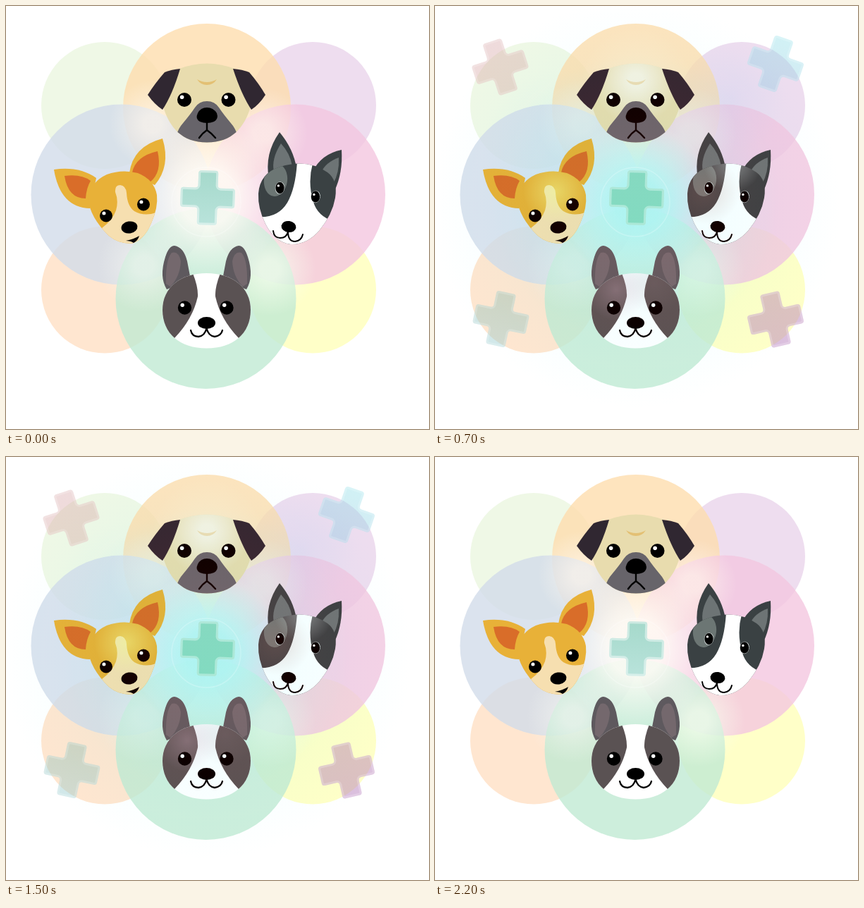
Recreate the animation shown at these times as an HTML page with a canvas. Size 600 by 600 pixels, loop 2.3 s.

```html
<!DOCTYPE html>
<html lang="en">
<head>
<meta charset="utf-8">
<title>Dogs and crosses</title>
<style>
html, body { margin: 0; width: 100%; height: 100%; overflow: hidden; background: #fff; }
canvas { display: block; width: 600px; height: 600px; }
</style>
</head>
<body>
<canvas id="stage" width="600" height="600"></canvas>
<script>
const ctx = document.getElementById('stage').getContext('2d');
const TAU = Math.PI * 2;
const STEP = 100, STEPS = 23, PEAK = 11;

function oval(x, y, rx, ry, color, deg = 0) {
  ctx.beginPath();
  ctx.ellipse(x, y, rx, ry, deg * TAU / 360, 0, TAU);
  ctx.fillStyle = color;
  ctx.fill();
}
const disc = (x, y, r, color) => oval(x, y, r, r, color);

function shape(d, color) {
  ctx.fillStyle = color;
  ctx.fill(new Path2D(d));
}

function line(d, width) {
  ctx.lineWidth = width;
  ctx.lineCap = ctx.lineJoin = 'round';
  ctx.strokeStyle = '#000';
  ctx.stroke(new Path2D(d));
}

function inside(d, draw) {
  ctx.save();
  ctx.clip(new Path2D(d));
  draw();
  ctx.restore();
}

function eye(x, y, r, ry = r) {
  oval(x, y, r, ry, '#000');
  disc(x - r * .34, y - ry * .38, r * .28, '#fff');
}

// Soft light fading out at radius r; rgb is "r,g,b"
function glow(x, y, r, rgb, alpha, hold = 0) {
  const g = ctx.createRadialGradient(x, y, 0, x, y, r);
  g.addColorStop(0, `rgba(${rgb},${alpha})`);
  g.addColorStop(hold, `rgba(${rgb},${alpha})`);
  g.addColorStop(1, `rgba(${rgb},0)`);
  ctx.fillStyle = g;
  ctx.fillRect(x - r, y - r, r * 2, r * 2);
}

function blend(mode, draw) {
  ctx.save();
  ctx.globalCompositeOperation = mode;
  draw();
  ctx.restore();
}

function cross(x, y, deg, top, bottom, alpha) {
  if (!alpha) return;
  ctx.save();
  ctx.translate(x, y);
  ctx.rotate(deg * TAU / 360);
  ctx.globalAlpha = alpha;
  const a = 38.5, b = 14, k = 4;
  const pts = [[-b, -a], [b, -a], [b, -b], [a, -b], [a, b], [b, b],
    [b, a], [-b, a], [-b, b], [-a, b], [-a, -b], [-b, -b]];
  ctx.beginPath();
  ctx.moveTo(0, -a);
  pts.forEach((p, i) => {
    const q = pts[(i + 1) % pts.length];
    if (i) ctx.arcTo(...p, ...q, k);
  });
  ctx.arcTo(-b, -a, 0, -a, k);
  ctx.closePath();
  const g = ctx.createLinearGradient(0, -a, 0, a);
  g.addColorStop(0, top);
  g.addColorStop(1, bottom);
  ctx.fillStyle = g;
  ctx.fill();
  ctx.clip();
  ctx.strokeStyle = 'rgba(255,255,255,.42)';
  ctx.lineWidth = 6;
  ctx.stroke();
  ctx.restore();
}

function circles() {
  disc(140, 141, 90, '#eff8e6');
  disc(435, 141, 90, '#eeddef');
  disc(140, 402.5, 90, '#ffe6d0');
  disc(435, 402.5, 90, '#ffffc8');
  disc(285, 144, 119, 'rgba(254,222,174,.8)');
  disc(163.5, 267.5, 128, 'rgba(211,220,234,.8)');
  disc(410, 267.5, 128, 'rgba(244,199,224,.8)');
  disc(283.5, 415, 128, 'rgba(193,234,212,.8)');
}

function lights(p) {
  const soft = 1 - p * .5;
  glow(208, 167, 62, '255,248,240', .62 * soft, .2);
  glow(364, 180, 64, '255,245,238', .66 * soft, .2);
  glow(196, 368, 66, '245,247,243', .6 * soft, .2);
  glow(374, 374, 66, '248,255,240', .66 * soft, .2);
  glow(285, 222, 70, '255,236,215', .5 * soft, .3);
  glow(285, 272, 110, '255,252,246', .85, .35);
  glow(285, 110, 80, '255,251,230', .5 * p);
  glow(285, 275, 205, '165,240,242', .44 * p, .12);
  glow(287, 280, 110, '120,242,240', .72 * p, .3);
  glow(420, 130, 78, '190,205,240', .3 * p);
  glow(180, 200, 110, '195,232,240', .3 * p);
  ctx.lineWidth = 1.5;
  ctx.strokeStyle = 'rgba(255,255,255,.25)';
  ctx.beginPath();
  ctx.arc(284, 278, 49, 0, TAU);
  ctx.stroke();
}

function pug(p) {
  const head = 'M246 89Q285 74 324 89L347 143C338 172 321 193.5 285 193.5C249 193.5 232 172 223 143Z';
  shape(head, '#e8dcae');
  inside(head, () => {
    if (p) glow(285, 105, 62, '255,255,255', p, .15);
    shape('M285 135Q296 135 302 144Q308 153 318 165Q326 174 328 183L316 198H254L242 183Q244 174 252 165Q262 153 268 144Q274 135 285 135Z', '#67646a');
  });
  shape('M247 89Q235 90 225 94Q211 110 201 126Q211 140 222 147Q236 126 247 89Z', '#302731');
  shape('M322 89Q335 90 345 94Q358 109 368 126Q359 140 348 147Q334 126 322 89Z', '#302731');
  ctx.globalAlpha = 1 - p * .9;
  shape('M271 104Q285 112 299 104Q294 112 285 112Q276 112 271 104Z', '#e3c074');
  ctx.globalAlpha = 1;
  eye(253, 133, 10);
  eye(315.5, 133, 10);
  shape('M285 144Q294 144 299 152Q302 160 295 164Q285 168 275 164Q268 160 272 152Q276 144 285 144Z', '#000');
  line('M285 163V176M274 187Q279 180 285 176Q291 180 297 187', 2.4);
}

function chihuahua(p) {
  const fur = '#e8b138', inner = '#d96d29';
  const head = 'M116 272Q121 249 143 239Q165 231 187 237Q210 246 214 268Q216 286 206 308Q196 332 178 337Q159 337 146 326Q119 300 116 272Z';
  shape('M68 232Q104 227 128 244L119 287Q77 286 68 232Z', fur);
  shape('M83 241Q107 238 120 248Q114 258 113 273Q88 273 83 241Z', inner);
  shape('M222 188Q180 199 175 237L211 254Q234 227 222 188Z', fur);
  shape('M215 206Q184 213 179 236Q193 238 204 250Q222 236 215 206Z', inner);
  shape(head, fur);
  inside(head, () => {
    shape('M155 264Q154 254 162 254Q170 255 171 265Q172 284 182 291Q196 299 213 293L212 340H145L136 315Q151 304 156 290Q160 276 155 264Z', '#f6dfb0');
    if (p) glow(171, 263, 46, '255,255,150', .75 * p);
  });
  eye(142, 297.5, 9);
  eye(195, 281.5, 9);
  oval(175, 314, 11.5, 8.5, '#000', -9);
  shape('M170 333Q181 331 189 326Q187 333 181 336Q177 333 170 333Z', '#000');
}

function terrier(p) {
  const fur = '#3a4143', inner = '#6d7475';
  const head = 'M358 266Q360 237 389 228Q427 216 456 236Q471 247 467 272Q463 296 444 319Q426 339 404 338Q381 335 368 309Q357 287 358 266Z';
  shape('M388 179Q366 210 373 245L412 230Q408 203 388 179Z', fur);
  shape('M390 195Q376 217 380 235L406 227Q403 209 390 195Z', inner);
  shape('M476 204Q447 210 435 235L466 262Q478 237 476 204Z', fur);
  shape('M472 215Q453 222 447 236L464 252Q473 237 472 215Z', inner);
  shape(head, fur);
  inside(head, () => {
    shape('M413 220H436Q427 249 436 278Q442 298 464 305L450 345H365L355 299Q385 302 399 279Q411 258 413 220Z', '#fff');
    oval(382.5, 247, 16.5, 23, '#6c7674', 8);
    if (p) {
      glow(385, 262, 48, '165,115,105', .36 * p);
      glow(422, 222, 42, '255,255,255', .6 * p);
    }
  });
  oval(388.5, 258, 6.7, 8.7, '#e8eeee', 8);
  oval(439, 270.5, 6.7, 8.7, '#e8eeee', 8);
  eye(388.5, 258, 6.2, 8.2);
  eye(439, 270.5, 6.2, 8.2);
  oval(401, 313, 10.5, 8, '#000', 8);
  line('M379 319Q380 329 389 329Q398 329 400 320Q400 334 410 334Q419 333 421 324', 2);
}

function mirrored(draw) {
  draw();
  ctx.save();
  ctx.translate(569, 0);
  ctx.scale(-1, 1);
  draw();
  ctx.restore();
}

function bulldog(p) {
  const head = 'M222 431C222 399 248 379 284.5 379C321 379 347 399 347 431C347 465 322 485.5 284.5 485.5C247 485.5 222 465 222 431Z';
  mirrored(() => {
    shape('M228 402Q217 384 226 356Q231 340 239 340Q252 342 257 362L262 388Z', '#5e595e');
    shape('M227 394Q226 360 235 350Q245 347 248 362Q247 384 233 398Z', '#74686d');
  });
  shape(head, '#fff');
  inside(head, () => {
    mirrored(() => shape('M261 370Q273 396 272 412Q265 444 239 471L210 480V370Z', '#5a5253'));
    if (p) {
      glow(257, 402, 44, '215,170,190', .5 * p);
      glow(311, 393, 45, '150,130,140', .25 * p);
    }
  });
  eye(253.5, 428, 9.7);
  eye(313, 428, 9.7);
  oval(284.5, 449.5, 12.5, 8.5, '#000');
  line('M262 460Q264 469 273 469Q282 468 284.5 457Q287 468 296 469Q305 468 307 460', 2.3);
}

function draw(p) {
  ctx.fillStyle = '#fff';
  ctx.fillRect(0, 0, 600, 600);
  circles();
  lights(p);
  cross(92.5, 86.5, -18, '#d8a9ab', '#d9a9a4', .66 * p);
  cross(483, 82, 19, '#94dfe8', '#9acbe2', .68 * p);
  cross(93.5, 444, 12, '#94beb2', '#9accd0', .7 * p);
  cross(483, 444.5, -13, '#bd86b3', '#b67fbd', .78 * p);
  cross(286, 272, 2, '#a5d9cb', '#b9e3db', 1);
  cross(286, 272, 2, '#74dabd', '#69d9b8', p ** .6);
  pug(p);
  chihuahua(p);
  terrier(p);
  bulldog(p);
  if (!p) return;
  blend('screen', () => glow(285, 275, 260, '80,6,4', .5 * p, .3));
  blend('multiply', () => glow(285, 280, 290, '215,252,255', .4 * p ** .6, .4));
}

function frame(now) {
  const k = Math.floor(now / STEP) % STEPS;
  draw(Math.min(k, STEPS - 1 - k) / PEAK);
  requestAnimationFrame(frame);
}
draw(0);
requestAnimationFrame(frame);
</script>
</body>
</html>
```
